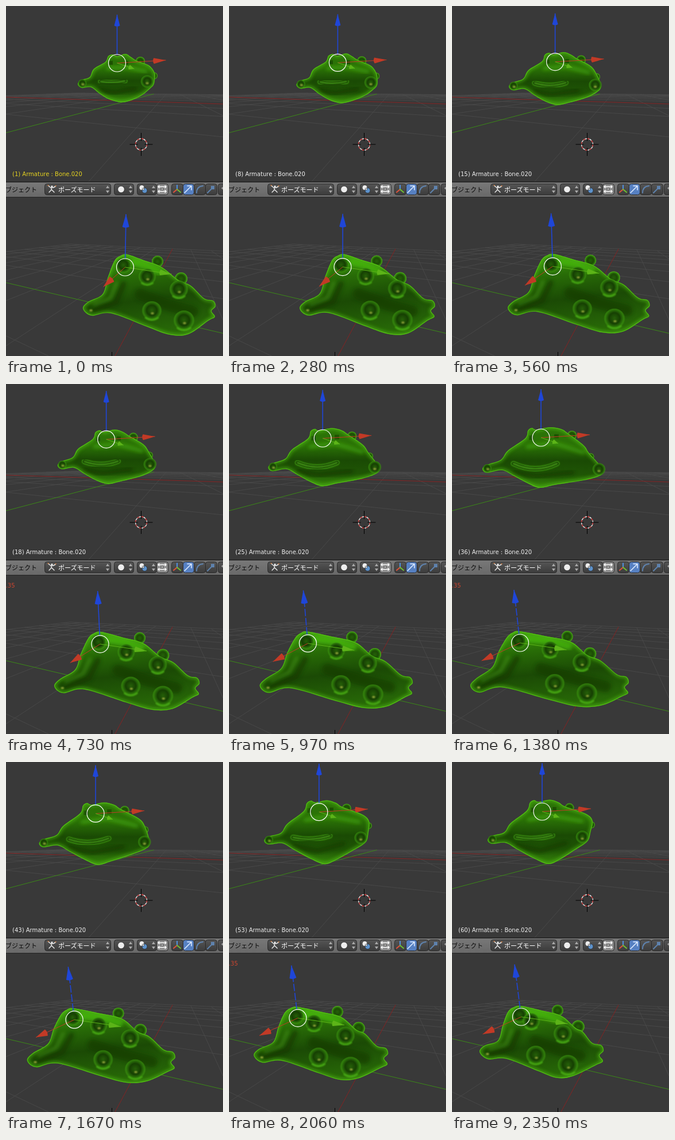
Animation of 378 by 607 pixels, one loop 2450 ms. Source, as an HTML page:

```html
<!DOCTYPE html>
<html lang="ja">
<head>
<meta charset="utf-8">
<title>Pose preview</title>
<style>
html, body { margin: 0; width: 100%; height: 100%; overflow: hidden; background: #393939; }
svg { display: block; width: 378px; height: 607px; }
text { font-family: "DejaVu Sans", sans-serif; font-size: 10px; }
.jp { font-family: "Noto Sans CJK JP", "Noto Sans CJK", sans-serif; font-size: 11px; }
</style>
</head>
<body>
<svg id="stage" viewBox="0 0 378 607">
  <defs>
    <linearGradient id="skinA" x2="0" y2="1">
      <stop offset="0" stop-color="#2b7208"/><stop offset=".3" stop-color="#2b7307"/>
      <stop offset=".55" stop-color="#1a4a04"/><stop offset=".78" stop-color="#1f5505"/>
      <stop offset="1" stop-color="#37890c"/>
    </linearGradient>
    <linearGradient id="skinB" x1=".4" y1="0" x2=".6" y2="1">
      <stop offset="0" stop-color="#3a980b"/><stop offset=".25" stop-color="#286c07"/>
      <stop offset=".55" stop-color="#1b4a05"/><stop offset="1" stop-color="#296c08"/>
    </linearGradient>
    <radialGradient id="ball">
      <stop offset="0" stop-color="#246008"/><stop offset=".55" stop-color="#1c4b05"/>
      <stop offset=".8" stop-color="#2b750a"/><stop offset="1" stop-color="#50b816"/>
    </radialGradient>
    <radialGradient id="knob" cy=".44">
      <stop offset="0" stop-color="#255f08"/><stop offset=".5" stop-color="#163f03"/>
      <stop offset=".76" stop-color="#2a7009"/><stop offset=".88" stop-color="#3c960f" stop-opacity=".55"/>
      <stop offset="1" stop-color="#3c960f" stop-opacity="0"/>
    </radialGradient>
    <linearGradient id="bar" x2="0" y2="1">
      <stop offset="0" stop-color="#787878"/><stop offset="1" stop-color="#696969"/>
    </linearGradient>
    <linearGradient id="btn" x2="0" y2="1">
      <stop offset="0" stop-color="#555"/><stop offset="1" stop-color="#3c3c3c"/>
    </linearGradient>
    <filter id="soft" x="-50%" y="-50%" width="200%" height="200%"><feGaussianBlur stdDeviation="3"/></filter>
    <filter id="haze" x="-50%" y="-50%" width="200%" height="200%"><feGaussianBlur stdDeviation="1"/></filter>
    <clipPath id="paneA"><rect width="378" height="305"/></clipPath>
    <clipPath id="paneB"><rect y="332" width="378" height="275"/></clipPath>
    <clipPath id="cutA"><path class="bodyA"/></clipPath>
    <clipPath id="cutB"><path class="bodyB"/></clipPath>
  </defs>
  <rect width="378" height="607" fill="#393939"/>
  <g id="viewA" clip-path="url(#paneA)"></g>
  <g id="viewB" clip-path="url(#paneB)"></g>
  <g id="header"></g>
</svg>
<script>
const LOOP = 2450, MID = 1380, END = 2350;
const $ = id => document.getElementById(id);

function set(e, attrs) { for (const k in attrs) e.setAttribute(k, attrs[k]); }
function add(parent, tag, attrs = {}, text) {
  const e = document.createElementNS('http://www.w3.org/2000/svg', tag);
  set(e, attrs);
  if (text) e.textContent = text;
  parent.appendChild(e);
  return e;
}

// The creature leans over with an eased swing, then turns back.
const lean = u => u * u * (3 - 2 * u);
const settle = u => u * (2 - u);
const steady = u => u;

// A track holds three poses in a row: start, lean, end.
function blend(track, t, back) {
  const n = track.length / 3, late = t > MID;
  const k = late ? back((t - MID) / (END - MID)) : lean(t / MID);
  return track.slice(0, n).map((_, i) => {
    const from = track[i + (late ? n : 0)], to = track[i + (late ? 2 * n : n)];
    return from + (to - from) * k;
  });
}

// Skin points follow the bones, the nearest bone most.
function skinner(bones, t, back) {
  const moves = bones.map(b => {
    const [x, y] = blend(b, t, back);
    return [b[0], b[1], x - b[0], y - b[1]];
  });
  return ([x, y]) => {
    let sum = 0, dx = 0, dy = 0;
    for (const [bx, by, mx, my] of moves) {
      const w = ((x - bx) ** 2 + (y - by) ** 2 + 4) ** -1.5;
      sum += w; dx += w * mx; dy += w * my;
    }
    return [x + dx / sum, y + dy / sum];
  };
}

const pairs = row => row.flatMap((x, i) => i % 2 ? [] : [[x, row[i + 1]]]);
const fix = n => n.toFixed(2);
const line = pts => 'M' + pts.map(p => p.map(fix).join()).join('L');

function closed(pts) {
  const n = pts.length, p = i => pts[(i + n) % n];
  let d = 'M' + p(0).map(fix);
  for (let i = 0; i < n; i++) {
    const [a, b, c, e] = [p(i - 1), p(i), p(i + 1), p(i + 2)];
    const c1 = b.map((x, k) => fix(x + (c[k] - a[k]) / 6));
    const c2 = c.map((x, k) => fix(x - (e[k] - b[k]) / 6));
    d += `C${c1} ${c2} ${c.map(fix)}`;
  }
  return d + 'Z';
}
function cone([x0, y0], [x, y], len, half) {
  const r = Math.hypot(x - x0, y - y0), dx = (x - x0) / r, dy = (y - y0) / r;
  const at = (f, s) => fix(x - dx * f + dy * s) + ',' + fix(y - dy * f - dx * s);
  return `M${at(0, 0)}L${at(len, half)}Q${at(len + 3, 0)} ${at(len, -half)}Z`;
}

// Floor lines meet at two vanishing points, (v1, hy) and (v2, hy).
function floor(g, { hy, v1, v2, a, da, b, db, colA, colB }) {
  const n = 8, top = a + n * da, low = b - n * db;
  const draw = (v, s, gap, colour) => {
    if (gap <= 0) return;
    const y = (v2 - v1) / gap;
    add(g, 'path', { d: line([[v + s * y, hy + y], [v + s * 900, hy + 900]]), stroke: colour || '#4c4c4c',
      'stroke-width': colour ? 1 : .8, fill: 'none' });
  };
  for (const axis of [false, true])
    for (let i = -n; i <= n; i++) {
      if ((i === 0) !== axis) continue;
      draw(v1, a + i * da, a + i * da - low, axis && colA);
      draw(v2, b + i * db, top - b - i * db, axis && colB);
    }
}
function cursor(g, x, y) {
  const ring = { cx: x, cy: y, r: 10, fill: 'none', 'stroke-width': 1.3 };
  add(g, 'circle', { ...ring, stroke: '#e8e8e8' });
  add(g, 'circle', { ...ring, stroke: '#c01818', 'stroke-dasharray': '3.93' });
  add(g, 'path', { d: `M${x - 20} ${y}h14m12 0h14M${x} ${y - 20}v14m0 12v14`, stroke: '#000' });
}

const ball = (g, r, fill = 'url(#ball)') => add(g, 'circle', { r, fill });
const move = (e, [x, y], dx = 0, dy = 0) => set(e, { cx: fix(x + dx), cy: fix(y + dy) });
const stroke = (g, colour, width, extra = {}) =>
  add(g, 'path', { fill: 'none', stroke: colour, 'stroke-width': width, 'stroke-linecap': 'round', 'stroke-linejoin': 'round', ...extra });
const soft = { filter: 'url(#soft)', opacity: .7 }, haze = { filter: 'url(#haze)', opacity: .85 };
const spark = g => add(g, 'ellipse', { rx: 2.8, ry: 1.8, fill: '#aab745', ...haze });

// Body with soft bands of light and shade, each bent along with the skin.
function body(g, name, bands) {
  const cls = { class: 'body' + name };
  add(g, 'path', { ...cls, fill: `url(#skin${name})` });
  const inner = add(g, 'g', { 'clip-path': `url(#cut${name})` });
  const marks = bands.map(([colour, width, pts]) => [stroke(inner, colour, width, soft), pairs(pts)]);
  stroke(inner, '#52bd14', 6, { ...cls, ...soft });
  stroke(inner, '#55c516', 2.5, { ...cls, opacity: .8 });
  return (outline, bend) => {
    const d = closed(outline.map(bend));
    document.querySelectorAll('.body' + name).forEach(e => set(e, { d }));
    for (const [e, pts] of marks) set(e, { d: line(pts.map(bend)) });
  };
}

function gizmo(g, sizes) {
  const arms = ['#1f46d8', '#c23a26', '#5cb418'].map(c => ({
    rod: add(g, 'path', { stroke: c, fill: 'none' }), tip: add(g, 'path', { fill: c }) }));
  const ring = add(g, 'circle', { r: 15, fill: 'none', stroke: '#fff', 'stroke-width': 1.2 });
  return (c, offsets) => {
    move(ring, c);
    offsets.forEach(([dx, dy], i) => {
      const p = [c[0] + dx, c[1] + dy], skip = i ? 0 : 15 / Math.hypot(dx, dy);
      const dashed = !i && Math.abs(dx) > 5;
      set(arms[i].rod, { d: line([p, [c[0] + dx * skip, c[1] + dy * skip]]), 'stroke-width': i ? 1 : 1.6,
        'stroke-dasharray': dashed ? '13 3' : 'none' });
      set(arms[i].tip, { d: cone(c, p, ...sizes[i]) });
    });
  };
}

function makeA() {
  const outline = pairs([163,152, 148,141, 132,142, 125,135, 133,128, 146,123, 153,109, 173,97, 178,87, 186,84,
    194,87, 208,83, 217,88, 228,95, 249,103, 259,116, 259,128, 257,137, 250,144, 238,154, 220,163, 201,167, 180,162]);
  const mouthL = [165,131, 107,138, 112,130], mouthR = [207,130, 183,138, 175,127];
  const horn = [246,132, 256,149, 227,131], pivot = [193.5,99, 155,93, 157,86];
  const bones = [mouthL, mouthR, horn,
    [125,135, 53,147, 62,135],   // arm
    [194,87, 147,79, 151,69],    // crown
    [221,92, 195,82, 190,74],    // shoulder
    [257,112, 236,115, 243,98],  // side
    [201,167, 153,180, 168,177]  // belly
  ];
  const g = $('viewA');
  floor(g, { hy: 145, v1: -410, v2: 286, a: 31.5, da: 7.3, b: -3.82, db: 2.93, colA: '#852222', colB: '#3b8718' });
  const spots = [[234,96], [258,121]].map((p, i) => [ball(g, 8 - i * 2), p]);
  const shape = body(g, 'A', [
    ['#43a30d', 7, [178,108, 208,106, 243,113]],
    ['#153f03', 13, [181,97, 184,100]],
    ['#153f03', 13, [210,97, 212,100]],
    ['#133a03', 9, [165,146, 190,150, 225,143]]
  ]);
  const armTip = ball(g, 8, 'url(#knob)'), armSpark = spark(g);
  const lip = stroke(g, '#429f13', 9, haze), gap = stroke(g, '#184604', 6), tongue = stroke(g, '#4da71a', 2.5, haze);
  const glint = stroke(g, '#b9b33f', 3, haze);
  const hornBall = ball(g, 12, 'url(#knob)'), hornSpark = spark(g);
  cursor(g, 235.5, 240);
  const handles = gizmo(g, [[19, 5], [21, 5], [9, 4]]);
  const label = add(g, 'text', { x: 11, y: 295 });

  return (t, n) => {
    const bend = skinner(bones, t, settle), at = track => blend(track, t, settle);
    shape(outline, bend);
    for (const [e, p] of spots) move(e, bend(p));
    move(hornBall, at(horn)); move(hornSpark, at(horn), 0, 2);
    move(armTip, bend([133, 135])); move(armSpark, bend([134, 136]));
    const l = at(mouthL), r = at(mouthR), [sag] = at([2, 9, 4]);
    const d = `M${l.map(fix)}Q${fix((l[0] + r[0]) / 2)},${fix((l[1] + r[1]) / 2 + 2 * sag)} ${r.map(fix)}`;
    for (const e of [lip, gap, tongue]) set(e, { d });
    set(glint, { d: line([[r[0] - 16, r[1] - 6], [r[0], r[1] - 6]]) });
    handles(at(pivot), [[0, -84], [85, -5], [30, 10]]);
    label.textContent = `(${n}) Armature : Bone.020`;
    set(label, { fill: n === 1 ? '#e6d321' : '#f0f0f0' });
  };
}

function makeB() {
  const outline = pairs([183,533, 149,537, 134,525, 143,513, 168,500, 177,472, 189,442, 200,433, 212,431, 240,441,
    270,452, 300,475, 322,485, 345,507, 361,511, 365,521, 358,529, 364,539, 352,546, 318,569, 285,570, 245,556]);
  const pivot = [207.5,453, 118.5,449, 120.5,442], face = [278,510, 203,501, 170,490];
  const bones = [
    [134,525, 32,524, 48,503],   // arm
    [168,500, 70,491, 80,483],   // armpit
    [207,434, 113,432, 115,426], // head
    [270,452, 207,447, 190,440], // back
    [354,530, 297,527, 253,510], // tail
    [318,569, 262,557, 210,545], // foot
    [245,556, 170,548, 150,536]  // belly
  ];
  const g = $('viewB');
  floor(g, { hy: 390, v1: -386, v2: 307, a: 4.3, da: 2.18, b: -.54, db: 1, colA: '#3b8718', colB: '#852222' });
  const horns = [[264,443], [305,473]].map((p, i) => [ball(g, 10 + i), p]);
  const shape = body(g, 'B', [
    ['#4cc010', 13, [224,444, 243,450, 266,460]],
    ['#163c03', 20, [234,500, 280,518, 325,530]],
    ['#133803', 9, [154,528, 192,514, 205,482]],
    ['#4c9c18', 4, [152,518, 182,507, 193,480]]
  ]);
  const brow = ball(g, 15, 'url(#knob)');
  const knobs = [[-32,-39], [23,-17], [-24,20], [32,37]].map(([x, y], i) => {
    const r = 16 + i % 2 + (i > 1 ? 2 : 0);
    return { orb: ball(g, r, 'url(#knob)'), glow: stroke(g, '#48ad14', 3, haze), dot: spark(g), x, y, r };
  });
  const armSpark = spark(g);
  cursor(g, 184.5, 620);
  const handles = gizmo(g, [[22, 6], [20, 6], [20, 5]]);
  const rate = add(g, 'text', { x: 15.5, y: 353, fill: '#cf4630', 'text-anchor': 'end' }, '23.35');

  return (t, step) => {
    const bend = skinner(bones, t, steady), at = track => blend(track, t, steady);
    shape(outline, bend);
    for (const [e, p] of horns) move(e, bend(p));
    const [fx, fy] = at(face), c = at(pivot);
    for (const { orb, glow, dot, x, y, r } of knobs) {
      const p = [fx + x, fy + y], w = r * .6;
      move(orb, p); move(dot, p, 1, 3);
      set(glow, { d: `M${fix(p[0] - w)},${fix(p[1] + w)}q${w},${w * .7} ${2 * w},0` });
    }
    move(brow, c, -3, -2);
    move(armSpark, bend([148, 528]));
    handles(c, [at([1.5,-92, -10.5,-92, -11.5,-91]), at([-38,34, -67,31, -67,30]), [81, 12]]);
    set(rate, { visibility: step && step % 6 === 0 ? 'visible' : 'hidden' });
  };
}

function makeHeader() {
  const g = $('header');
  const box = (x, w, fill = 'url(#btn)') => add(g, 'rect', { x: x + .5, y: 308.5, width: w, height: 19, rx: 4, fill, stroke: '#2a2a2a' });
  const icon = (d, c, w = 1.5) => stroke(g, c, w, { d });
  const arrows = x => add(g, 'path', { d: `M${x - 3} 316l3 -4.5l3 4.5zM${x - 3} 320l3 4.5l3 -4.5z`, fill: '#aaa' });
  const dot = (cx, cy, r, fill) => add(g, 'circle', { cx, cy, r, fill, stroke: '#222', 'stroke-width': .7 });
  add(g, 'rect', { y: 304.5, width: 378, height: 27.5, fill: '#242424' });
  add(g, 'rect', { y: 306, width: 378, height: 25, fill: 'url(#bar)' });
  add(g, 'text', { class: 'jp', x: 54, y: 323, 'text-anchor': 'end', fill: '#090909' }, 'オブジェクト');
  box(67, 115);
  dot(80, 313, 2, '#fff');
  icon('M74 312l4 3h4l4 -2M79 315v4l-4 4M80 319l4 4', '#eee', 1.4);
  icon('M73 311h1M86 312h1', '#d87c3a', 1.6);
  add(g, 'text', { class: 'jp', x: 91, y: 323, fill: '#fff' }, 'ポーズモード');
  box(188, 34);
  dot(200.5, 318, 5.8, '#ededed');
  box(228, 34);
  dot(236.5, 315, 4.5, '#eee');
  dot(241.5, 320, 4.5, '#5d92cc');
  dot(239, 317.5, 1.7, '#fff');
  [177, 217, 257].forEach(arrows);
  box(262, 20, '#8c8c8c');
  for (const y of [313.5, 321.5]) icon(`M265 ${y}h14m-12 -2l-2 2l2 2m10 -4l2 2l-2 2`, '#fff', 1.3);
  dot(272, 317.5, 1.8, '#ddd');
  box(288, 20);
  ['#4f8fe0', '#e0523b', '#6fc232'].forEach((c, i) => icon('M298 318' + ['v-7', 'l-6 5', 'l6 5'][i], c, 2));
  box(308, 19, '#5680c2');
  icon('M311 324l11 -11M316 312h7v7', '#dbe9ff', 1.6);
  box(327, 20);
  icon('M332 324q0 -11 11 -12', '#5e82ad', 2);
  box(347, 20);
  icon('M351 324l7 -7', '#5e82ad', 2);
  add(g, 'rect', { x: 357, y: 312, width: 6, height: 6, fill: '#5e82ad' });
  box(369, 40);
  icon('M380 313l-4 3l4 3', '#aaa');
}

// Picture change times, evenly spread inside each run.
const stops = [0];
for (const [from, to, n] of [[60, 560, 10], [620, 1140, 10], [1200, 1670, 9], [1730, 2230, 10], [2290, 2350, 2]])
  for (let k = 0; k < n; k++) stops.push(Math.round((from + (to - from) * k / (n - 1)) / 10) * 10);

const drawA = makeA(), drawB = makeB();
makeHeader();

let last = -1;
function show(ms) {
  const t = ms % LOOP;
  let step = stops.length - 1;
  while (step && stops[step] > t) step--;
  if (step === last) return;
  last = step;
  const at = stops[step];
  drawA(at, Math.round(1 + at / END * 59));
  drawB(at, step);
}
const begin = performance.now();
function tick() {
  show(performance.now() - begin);
  requestAnimationFrame(tick);
}
show(0);
requestAnimationFrame(tick);
</script>
</body>
</html>
```
